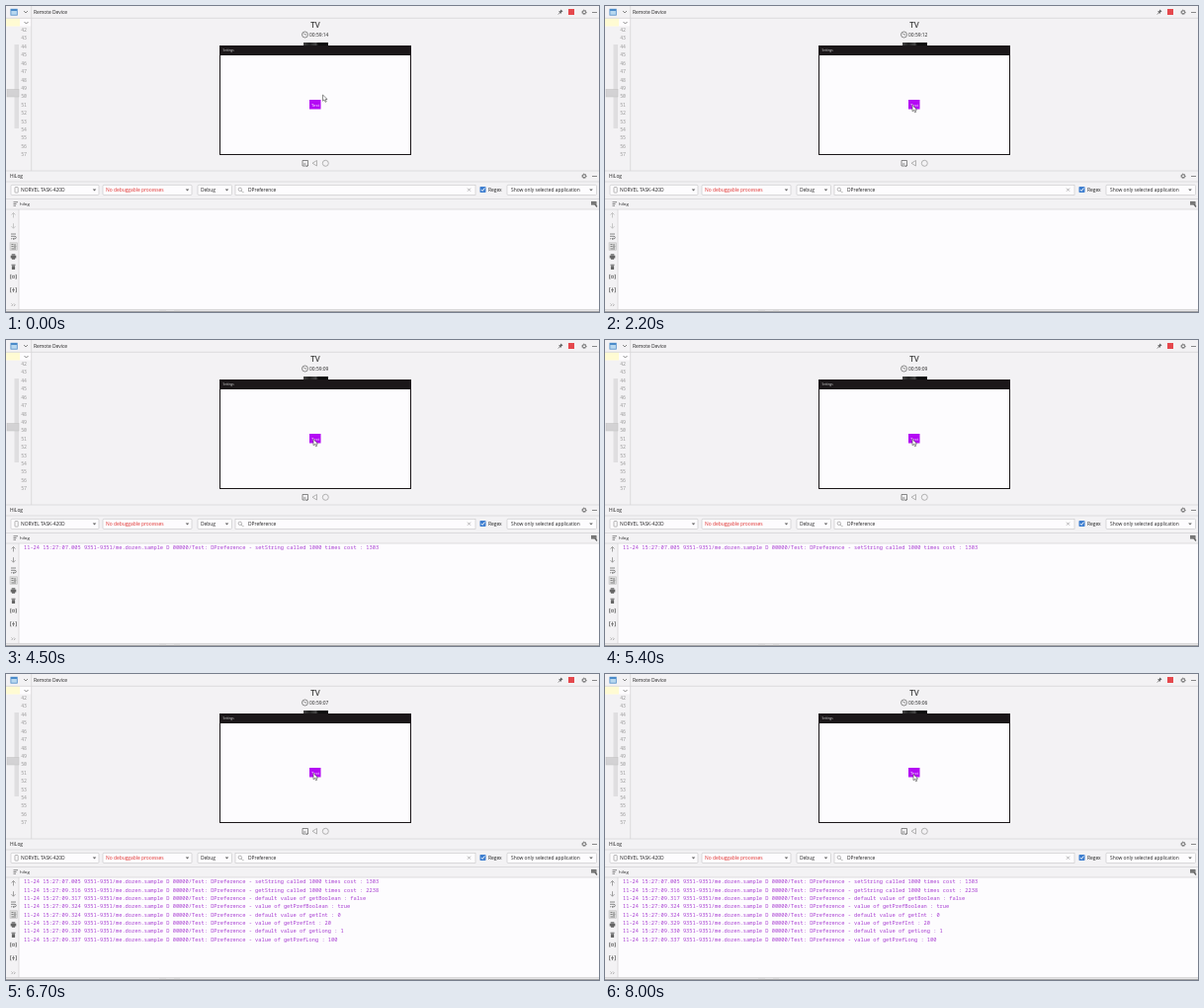
Recreate the animation shown at these times as an HTML page. Size 600 px wide and 310 px high, loop 8100 ms.

```html
<!DOCTYPE html>
<html lang="en">
<head>
<meta charset="utf-8">
<title>Log console</title>
<style>
  html, body { margin: 0; width: 100%; height: 100%; overflow: hidden; background: #f3f2f4; }
  svg { display: block; width: 600px; height: 310px; }
  text { font: 4.9px "Open Sans", "Noto Sans", sans-serif; fill: #222; white-space: pre; }
  .mid { text-anchor: middle; }
  #log text { font: 5.357px "Noto Sans Mono", monospace; fill: #a83fd2; }
  #gutter text { font: 4.9px "Noto Sans Mono", monospace; fill: #999; text-anchor: end; }
  .box { fill: #fdfcfe; stroke: #cbcacc; stroke-width: .7; }
  .rule { stroke: #d6d5d7; stroke-width: .8; }
  .ico { fill: none; stroke: #6e6e6e; stroke-width: .8; }
  .pale { stroke: #a2a2a2; }
  .dark { fill: #666; }
</style>
</head>
<body>
<svg viewBox="0 0 600 310">
  <defs>
    <linearGradient id="strip">
      <stop offset="0" stop-color="#444"/><stop offset=".25" stop-color="#222"/>
      <stop offset=".5" stop-color="#484848"/><stop offset=".6" stop-color="#0c0c0c"/>
    </linearGradient>
    <g id="gear" class="ico">
      <circle r="1.6" stroke-width="1"/><circle r="2.3" stroke-dasharray=".9" stroke-width=".8"/>
    </g>
    <path id="drop" class="dark" d="M-1.800-.9h3.600l-1.800 2z"/>
    <path id="chev" class="ico" d="M-2-1l2 2 2-2"/>
    <path id="arrow" class="ico" d="M0 2.5v-5m-2 2l2-2 2 2" style="stroke:inherit"/>
  </defs>
  <rect width="600" height="310" fill="#f3f2f4"/>

  <!-- editor edge -->
  <rect y="12.5" width="25.5" height="8" fill="#fdfcfe"/>
  <rect y="12.5" width="14" height="8" fill="#fffbd3"/>
  <rect x="8.5" y="39" width="4.5" height="85" fill="#dfdee0"/>
  <rect x="1" y="84.500" width="12" height="7.500" fill="#d3d2d4" stroke="#c0c0c0" stroke-width=".5"/>
  <g id="gutter"></g>
  <path class="rule" d="M0 12.300h600M25.700 0v167M0 167h600M0 178h600M0 195.500h600"/>

  <!-- title bar -->
  <rect x="4.500" y="2.800" width="7.200" height="6.800" fill="#4a8bc9"/>
  <rect x="5.300" y="5" width="5.600" height="3.800" fill="#b9d8ef"/>
  <use href="#chev" x="20" y="6"/><use href="#chev" x="20.500" y="17"/>
  <text x="28" y="8">Remote Device</text>
  <path class="dark" d="M561.500 3.500l2 2-1.700 1-.3 1.500-2.500-2.500 1.500-.3z"/>
  <path class="ico" d="M558.800 8.500l2-2"/>
  <rect x="569" y="3" width="6" height="6" fill="#e5484d"/>
  <use href="#gear" x="585" y="6.300"/><path class="ico" d="M593 6.500h5"/>

  <!-- device -->
  <text class="mid" x="313" y="22" style="font-size:8px;font-weight:600;fill:#444">TV</text>
  <circle class="ico" cx="302.500" cy="29" r="3"/><path class="ico" d="M302.500 29l-1.500-1.500M302.500 29h1.500"/>
  <text id="clock" x="307" y="31"></text>
  <rect x="301" y="37" width="25" height="3" fill="url(#strip)"/>
  <rect x="216" y="40" width="194" height="111" fill="#1b1719"/>
  <rect x="217" y="50" width="192" height="100" fill="#fdfcfe"/>
  <text x="219.500" y="46.300" style="font-size:3px;fill:#ddd">Settings</text>
  <rect x="307" y="95" width="11.500" height="9.500" fill="#b408f4"/>
  <text class="mid" x="313" y="101.600" style="font-size:4.2px;fill:#fff">Test</text>
  <path class="ico" d="M300 156.500h5.500v5.500h-5.500zM301 160h2.500M304 163l2-2" stroke-width=".8"/>
  <path class="ico pale" d="M314.500 156.500v5.500l-4.500-2.750z"/>
  <circle class="ico pale" cx="323.300" cy="159.300" r="3"/>

  <!-- log header and filters -->
  <text x="4" y="174.200">HiLog</text>
  <use href="#gear" x="585" y="172.300"/><path class="ico" d="M593 172.500h5"/>
  <g class="box">
    <rect x="5" y="181.300" width="89" height="10.200" rx="1"/>
    <rect x="98" y="181.300" width="90" height="10.200" rx="1"/>
    <rect x="194" y="181.300" width="34.500" height="10.200" rx="1"/>
    <rect x="232" y="181.300" width="243" height="10.200"/>
    <rect x="507" y="181.300" width="90.500" height="10.200" rx="1"/>
  </g>
  <use href="#drop" x="89.500" y="186.300"/><use href="#drop" x="183.500" y="186.300"/>
  <use href="#drop" x="223.500" y="186.300"/><use href="#drop" x="592" y="186.300"/>
  <rect class="ico pale" x="9" y="183.500" width="3.200" height="5.600" rx=".6"/>
  <text x="15" y="188.200">NORVEL TASK-420D</text>
  <text x="101" y="188.200" style="fill:#e0302e">No debuggable processes</text>
  <text x="197" y="188.200">Debug</text>
  <circle class="ico pale" cx="236.800" cy="185.800" r="1.700"/>
  <path class="ico pale" d="M238 187l1.500 1.500h1"/>
  <text x="245" y="188.200">DPreference</text>
  <path class="ico pale" d="M467 184.700l3 3m0-3l-3 3"/>
  <rect x="479.500" y="183" width="6" height="6" rx=".8" fill="#3f7fd0"/>
  <path d="M480.800 186l1.300 1.400 2.300-3" fill="none" stroke="#fff" stroke-width=".9"/>
  <text x="488" y="188.200">Regex</text>
  <text x="511" y="188.200">Show only selected application</text>

  <path class="ico" d="M7.500 198.700h4.500M7.500 200.500h3M7.500 202.300h2.500" stroke-width="1"/>
  <text x="14" y="202.400" style="font-size:4.3px">hilog</text>
  <path class="dark" d="M592 198h5.500v3.500l1 1.500-1 1-2-2.500h-3.500z"/>
  <path d="M592 199.700h5.500" stroke="#ccc" stroke-width=".4"/>

  <!-- console -->
  <rect x="13" y="206" width="587" height="101.500" fill="#fdfcfe"/>
  <path class="rule" d="M0 206h600M13 206v101.500"/>
  <g id="nav"><use href="#arrow" x="7.500" y="212"/><use href="#arrow" transform="translate(7.500 222.700) scale(1 -1)"/></g>
  <g class="ico">
    <path d="M5 231h5M5 233.300h4a1.200 1.200 0 0 1 0 2.500h-2m1-1l-1 1 1 1M5 235.800h1"/>
    <rect x="4" y="239.800" width="7.500" height="7.500" fill="#dcdcdc" stroke="#bbb" stroke-width=".5"/>
    <path d="M5.500 241.500h2M5.500 243.500h2M5.500 246h4.500M9 241v3.500m-1-1l1 1 1-1"/>
    <path d="M5.500 272.300H4.500v4h1M9.500 272.300h1v4h-1M6.300 273.300h2.400v2H6.300z"/>
    <path d="M5.500 285.500H4.500v4.500h1M9.500 285.500h1v4.500h-1M7.500 285.500v4.500M6 287.700h3"/>
    <path class="pale" d="M5.500 301.500l1.300 1.300-1.300 1.300m2.500-2.600l1.300 1.300-1.300 1.300"/>
  </g>
  <path class="dark" d="M5.700 251.300h3.600v1.200H5.700zM4.700 252.800h5.600v2.700h-1.200v1.200H5.900v-1.200H4.700zM5.500 261.700h4v1h-4zM5.900 263.200h3.200v3.800H5.900z"/>
  <g id="log"></g>
  <path d="M0 307.800h600" stroke="#c4c3c5" stroke-width=".8"/>
  <path d="M0 309.600h600" stroke="#8a898b" stroke-width=".8"/>
  <path d="M155 309.300h7m8 0h6" stroke="#aaa" stroke-width=".8"/>

  <path id="mouse" d="M0 0v6.200l1.500-1.300 1.100 2.400 1.100-.5-1-2.300h1.900z" fill="#fff" stroke="#444" stroke-width=".6"/>
</svg>
<script>
  const LOOP = 8100;
  const $ = id => document.getElementById(id);

  function addText(parent, x, y, str) {
    const el = document.createElementNS("http://www.w3.org/2000/svg", "text");
    el.setAttribute("x", x);
    el.setAttribute("y", y);
    el.textContent = str;
    parent.append(el);
    return el;
  }

  for (let n = 42; n <= 57; n++) addText($("gutter"), 21, 26 + (n - 42) * 8.42, n);

  const rows = [
    ["07.005", "setString called 1000 times cost : 1303"],
    ["09.316", "getString called 1000 times cost : 2238"],
    ["09.317", "default value of getBoolean : false"],
    ["09.324", "value of getPrefBoolean : true"],
    ["09.324", "default value of getInt : 0"],
    ["09.329", "value of getPrefInt : 20"],
    ["09.330", "default value of getLong : 1"],
    ["09.337", "value of getPrefLong : 100"]
  ].map(([sec, msg], i) => addText($("log"), 18, 212.3 + i * 8.36,
    `11-24 15:27:${sec} 9351-9351/me.dozen.sample D 00000/Test: DPreference - ${msg}`));

  const firstLog = 4300, restLog = 6700;
  const ticks = [700, 1600, 2600, 3400, 4400, 5600, 6400, 7600];
  // time, x, y
  const path = [[0, 320.5, 90], [900, 309, 100], [1000, 309, 100], [1400, 311, 100.5],
    [7600, 311, 100.5], [8000, 312, 101.5], [LOOP, 312, 101.5]];

  function mouseAt(t) {
    const i = path.findIndex(p => p[0] > t);
    const [t0, x0, y0] = path[i - 1], [t1, x1, y1] = path[i];
    const u = (t - t0) / (t1 - t0), e = u * u * (3 - 2 * u);
    return [x0 + (x1 - x0) * e, y0 + (y1 - y0) * e];
  }

  function draw(now) {
    const t = now % LOOP;
    const left = 14 - ticks.filter(k => t >= k).length;
    $("clock").textContent = "00:59:" + String(left).padStart(2, "0");
    $("mouse").setAttribute("transform", `translate(${mouseAt(t)})`);
    $("nav").setAttribute("stroke", t < firstLog ? "#bbb" : "#8c8c8c");
    rows.forEach((row, i) => {
      row.style.display = t >= (i ? restLog : firstLog) ? "" : "none";
    });
  }

  function frame() {
    draw(performance.now());
    requestAnimationFrame(frame);
  }
  frame();
</script>
</body>
</html>
```
